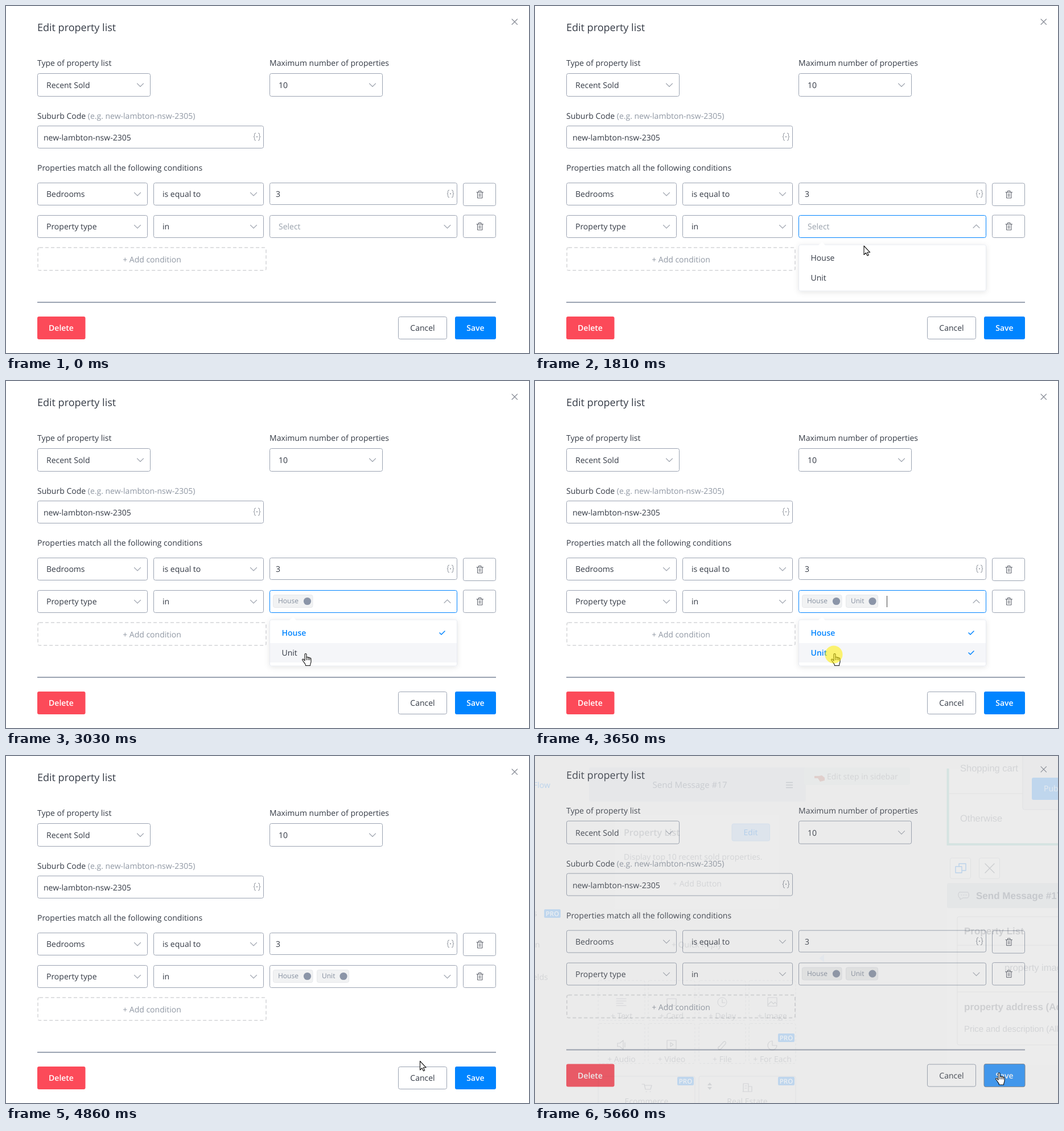
Recreate the animation shown at these times as an HTML page. Size 919 by 609 pixels, loop 5.88 s.

```html
<!DOCTYPE html>
<html lang="en">
<head>
<meta charset="utf-8">
<title>Edit property list</title>
<style>
  html, body { margin: 0; width: 100%; height: 100%; overflow: hidden; background: #fff; }
  svg { display: block; width: 919px; height: 609px; font: 14px "Open Sans", "Noto Sans", sans-serif; text-rendering: geometricPrecision; }
  .arial { font-family: "Liberation Sans", Arial, sans-serif; }
  .line { fill: none; stroke-linecap: round; stroke-linejoin: round; }
  #dialog { mix-blend-mode: multiply; }
</style>
</head>
<body>
<svg id="stage" viewBox="0 0 919 609" xmlns="http://www.w3.org/2000/svg"></svg>
<script>
const INK = '#343a45', MUTED = '#8f97a3', BORDER = '#9ba3b2', BLUE = '#0084ff', RED = '#fc4a59';

const text = (x, y, s, fill = INK, more = '') => `<text x="${x}" y="${y}" fill="${fill}" ${more}>${s}</text>`;
const mid = (x, y, s, fill, more = '') => text(x, y, s, fill, 'text-anchor="middle" ' + more);
const box = (x, y, w, h, stroke = BORDER, fill = 'none', r = 3, more = '') =>
  `<rect x="${x}" y="${y}" width="${w}" height="${h}" rx="${r}" stroke="${stroke}" fill="${fill}" ${more}/>`;
const line = (d, stroke, width = 1, more = '') =>
  `<path class="line" d="${d}" stroke="${stroke}" stroke-width="${width}" ${more}/>`;
const group = (id, body, more = '') => `<g id="${id}" ${more}>${body}</g>`;

const chevron = (x, y, up = 1) => line(`M${x - 5.5} ${y - 2.5 * up}l5.5 ${5.5 * up}l5.5 ${-5.5 * up}`, '#a0a6b0', 1.1);
const select = (x, y, w, h, label) =>
  box(x, y, w, h) + text(x + 15.5, Math.round(y + h / 2 + 5.4), label) + chevron(x + w - 17.5, y + h / 2);
const brace = (x, y, side) =>
  line(`M${x + 2.5 * side} ${y - 6.5}q${2 * side} 0 ${2 * side} 2.5v2q0 2 ${1.5 * side} 2q${-1.5 * side} 0 ${-1.5 * side} 2v2q0 2.5 ${-2 * side} 2.5`, '#858b95');
const braces = (x, y) => brace(x, y, -1) + brace(x, y, 1) + `<circle cx="${x}" cy="${y}" r="1" fill="#858b95"/>`;
const trash = y => box(803.5, y, 57, 39.5) +
  line(`M827 ${y + 16}h11.5M830.5 ${y + 15.5}v-2h4.5v2M828.5 ${y + 16}v10h8.5v-10M831.5 ${y + 18.5}v5M834 ${y + 18.5}v5`, '#5a5f69');
const tag = (id, x, w, label) => group(id,
  box(x + .5, 375.5, w, 22, '#e6e8eb', '#f1f2f3') + text(x + 9, 390, label, '#858f9f', 'font-size="12"') +
  `<circle cx="${x + w - 9}" cy="386.5" r="6.6" fill="#8b95a8"/>`);
const option = (i, label) => {
  const y = 442 + 35 * i;
  return `<rect id="hover${i}" x="464" y="${y - 17}" width="328" height="34" fill="#f5f6f9"/>` +
    text(484.5, y + 5, label, INK, `id="option${i}"`) +
    line(`M762 ${y}l3 3l6 -6`, BLUE, 1.5, `id="check${i}"`);
};

function dialog() {
  return text(55, 44, 'Edit property list', INK, 'font-size="18"') +
    line('M889 23l9.5 9.5M898.5 23l-9.5 9.5', '#858a94', 1.1) +
    text(55, 105, 'Type of property list') + select(55.5, 118.5, 198, 40, 'Recent Sold') +
    text(463, 105, 'Maximum number of properties') + select(463.5, 118.5, 198, 40, '10') +
    text(55, 198, `Suburb Code <tspan fill="${MUTED}">(e.g. new-lambton-nsw-2305)</tspan>`) +
    box(55.5, 210.5, 397, 39) + text(66, 236, 'new-lambton-nsw-2305') + braces(441, 229.5) +
    text(55, 289, 'Properties match all the following conditions') +
    select(55.5, 310.5, 193, 39, 'Bedrooms') + select(259.5, 310.5, 193, 39, 'is equal to') +
    box(463.5, 310.5, 329, 38) + text(474, 335, '3') + braces(781, 329.5) + trash(311) +
    select(55.5, 367.5, 193, 39, 'Property type') + select(259.5, 367.5, 193, 39, 'in') +
    box(463.5, 367.5, 329, 39, BORDER, 'none', 3, 'id="field"') +
    text(479, 392, 'Select', '#98a0ab', 'id="placeholder"') +
    group('down', chevron(775.5, 387)) + group('up', chevron(775.5, 387, -1)) +
    tag('tag0', 469, 69.5, 'House') + tag('tag1', 546, 56, 'Unit') +
    '<rect id="caret" y="377" width="1" height="20" fill="#444"/>' +
    trash(367) +
    box(56, 424, 401, 40, '#dedfe1', 'none', 3, 'stroke-width="2" stroke-dasharray="6 4"') +
    mid(256.5, 450, '+ Add condition', MUTED) +
    `<rect x="55" y="519" width="806" height="2" fill="${BORDER}"/>` +
    box(55, 545, 84.5, 40, 'none', RED) + mid(97, 570, 'Delete', '#fff', 'font-weight="600"') +
    box(689.5, 545.5, 85, 39) + mid(732, 570, 'Cancel') +
    box(789, 545, 72, 40, 'none', BLUE, 3, 'id="save"') + mid(825, 570, 'Save', '#fff', 'font-weight="600"');
}

const popup = () => box(463.5, 419, 329, 81, '#e8ebf1', '#fff', 3, 'filter="url(#shadow)"') +
  '<path d="M498 420l6 -6l6 6z" fill="#fff"/>' + option(0, 'House') + option(1, 'Unit');

// The dimmed editor that shows through while the dialog fades.
function page() {
  const faint = '#c3c5c9', edge = '#dadbdd', pale = '#eeeeee', sky = '#a3c9ef';
  const pro = (x, y) => box(x, y, 29, 15, 'none', sky, 2) + mid(x + 14.5, y + 12, 'PRO', '#eef3f8', 'font-size="11.5" font-weight="600"');
  const cell = (x, y, label) => box(x - 41, y - 38, 82, 70, edge, 'none', 3, 'stroke-dasharray="4 3"') + mid(x, y + 29, label, faint);
  const bold = 'class="arial" font-weight="700" font-size="17"', plain = 'class="arial" font-size="16.5"';
  const columns = [152, 240, 329, 417];
  const cells = [['+ Text', '+ Card', '+ Delay', '+ Image'], ['+ Audio', '+ Video', '+ File', '+ For Each']];
  return box(95, 20, 381, 60, 'none', '#e3e5e8') + mid(272, 56, 'Send Message #17', '#b3b8c0', 'font-size="15"') +
    line('M441.5 46.5h11M441.5 51h11M441.5 55.5h11', '#b5bac1', 1.3) +
    text(-3, 56, 'Flow', '#9cc4ec') +
    box(473, 20, 186, 31, 'none', '#e6e9e8') + text(513, 41, 'Edit step in sidebar', faint) +
    '<path d="M491 35h8l5 -1l5 4v5l-8 2l-4 -6h-6z" fill="#d9bdb8"/>' +
    box(140, 103, 288, 165, 'none', pale) + text(156, 140, 'Property List', faint, 'font-size="16" font-weight="600"') +
    box(346, 119, 66.5, 30, '#c5d8eb', '#d5e1ed') + mid(379, 139, 'Edit', '#8dbbea') +
    text(156, 182, 'Display top 10 recent sold properties.', faint) +
    mid(285, 229, '+ Add Button', faint) + pro(16, 269) +
    text(-3, 281, 's', faint) + text(0, 336, 'n', faint) + text(-4, 393, 'elds', faint) +
    mid(284, 336, '+ Quick Reply', faint) + '<path d="M499 355l9 -7v14z" fill="#dfe6ed"/>' +
    cells.map((row, r) => row.map((s, c) => cell(columns[c], 432 + r * 75.5, s)).join('')).join('') +
    line('M143 426h17M143 430h17M143 434h12M143 438h17M232 426h16v12h-16zM329 427v6h5M409 424h16v15h-16zM410 436l5 -5l4 4l3 -3l3 4', faint, 1.2) +
    '<circle cx="329" cy="432" r="8" fill="none" stroke="#c3c5c9"/>' +
    line('M145 504h4l6 -5v16l-6 -5h-4zM158 503v8M232 499h16v15h-16zM238 503v7l5 -3.5zM323 511l8 -9c3 -3 6 1 3 4l-7 8c-4 3 -7 -1 -4 -4zM417 500a8 8 0 1 0 8 8h-8z', faint, 1.2) +
    pro(427, 487) +
    box(111, 562, 170, 60, edge) + box(288, 562, 170, 60, edge) +
    line('M188 576h4l2 9h9l2 -7h-12M195 589h1M202 589h1M366 589v-14h9v14M375 580h6v9h-16M369 579h3M369 583h3', faint, 1.2) +
    '<path d="M303 578l4 -5l4 5zM303 581l4 5l4 -5z" fill="#c3c5c9"/>' +
    pro(250, 563) + pro(427, 563) + mid(196, 611, 'Ecommerce', faint) + mid(373, 611, 'Real Estate', faint) +
    '<path d="M725.5 22V155H919" fill="none" stroke="#c8dfdc" stroke-width="4"/>' +
    box(728, 22, 200, 131, 'none', pale, 0) + line('M728 66h191', edge) +
    text(747, 27, 'Shopping cart', faint, plain) + text(747, 115, 'Otherwise', faint, plain) +
    box(857, -5, 80, 99, edge, '#e9e9ea') + box(873, 38, 60, 39, 'none', sky) + text(894, 62, 'Pub', '#e3ebf3') +
    box(729.5, 179, 36, 36, edge, pale) + box(780.5, 179, 36, 36, edge, pale) +
    line('M739 194h11v11h-11zM745 194v-5h12v12h-6', '#9cc3ea', 1.4) + line('M791 189l16 16M807 189l-16 16', '#b8bbc0', 1.4) +
    box(724, 223, 210, 44, 'none', '#e1e3e5') + box(724, 267, 210, 275, 'none', pale, 0) +
    line('M746 239h14c3 0 3 10 0 10h-8l-5 3v-3c-4 0 -4 -10 -1 -10M749 244h1M753 244h1M757 244h1', '#b9bdc3') +
    text(775, 251, 'Send Message #17', '#aeb3ba', bold) +
    box(742, 282, 190, 225, edge) + line('M742 332h177M742 414h177', edge) +
    text(754, 313, 'Property List', '#bbbdc1', bold) + text(825, 377, 'property image', faint, plain) +
    text(754, 446, 'property address (Address)', '#bbbdc1', bold) +
    text(754, 484, 'Price and description (All)', faint, 'class="arial" font-size="15"');
}

const ARROW = 'M.5 .5V16L4 12.7L6.5 17.7L8.7 16.7L6.4 11.8H11.2Z';
const HAND = 'M5 13V2C5 0 8 0 8 2V7.5C8 6 11 6 11 8C11 6.7 13.7 6.8 13.7 8.7C13.7 7.6 16 7.8 16 9.7V14.5' +
  'C16 17 14.5 18 14.5 21.5H6.5C6.5 18.5 4.5 17.5 3.3 15.3L.8 11.8C0 10.3 2 9.3 3.2 10.8ZM8 7.5V12M11 8V12M13.7 9V12';
const cursor = (id, d) => `<path id="${id}" d="${d}" fill="#fff" stroke="#111" stroke-width="1.1" stroke-linejoin="round"/>`;

document.getElementById('stage').innerHTML =
  '<defs><filter id="shadow" x="-10%" y="-30%" width="120%" height="160%"><feDropShadow dx="0" dy="2" stdDeviation="5" flood-color="#000" flood-opacity=".1"/></filter></defs>' +
  '<rect width="919" height="609" fill="#fff"/>' +
  group('page', '<rect width="919" height="609" fill="#ebebeb"/>' + group('editor', page(), 'opacity=".6"')) +
  group('dialog', dialog()) + group('popup', popup()) +
  group('pointer', cursor('arrow', ARROW) + cursor('hand', HAND) +
    '<circle id="ripple" cx="5" cy="2" r="15.5" fill="#ffee00" fill-opacity=".55"/>');

const LOOP = 5880;
const steps = [
  { at: 0 },
  { at: 590, arrow: [869, 534] },
  { at: 1200, hand: [764, 385] },
  { at: 1810, arrow: [577.5, 420.5], open: true },
  { at: 2410, hand: [545, 443], click: true, open: true, picked: 1, hover: 0, caret: 555 },
  { at: 3030, hand: [520, 478], open: true, picked: 1, hover: 1 },
  { at: 3650, hand: [520, 478], click: true, open: true, picked: 2, hover: 1, caret: 618 },
  { at: 4230, arrow: [421, 497.5], open: true, picked: 2 },
  { at: 4860, arrow: [727, 535], picked: 2 },
  { at: 5460, hand: [809, 555], click: true, picked: 2, saving: true },
  { at: 5660, hand: [809, 555.5], picked: 2, saving: true, closing: true }
];

const $ = id => document.getElementById(id);
const show = (id, on) => $(id).setAttribute('display', on ? 'inline' : 'none');
const set = (id, name, value) => $(id).setAttribute(name, value);

function render(time) {
  const s = steps.filter(step => step.at <= time).pop();
  const { picked = 0, open = false, closing = false } = s;
  const at = s.arrow || s.hand || [0, 0];
  show('arrow', s.arrow);
  show('hand', s.hand);
  show('ripple', s.click);
  set('pointer', 'transform', `translate(${at})`);
  show('popup', open);
  show('up', open);
  show('down', !open);
  set('field', 'stroke', open ? BLUE : BORDER);
  show('placeholder', !picked);
  show('caret', s.caret);
  set('caret', 'x', s.caret || 0);
  [0, 1].forEach(i => {
    const chosen = picked > i;
    show('tag' + i, chosen);
    show('check' + i, chosen);
    show('hover' + i, s.hover === i);
    set('option' + i, 'fill', chosen ? BLUE : INK);
    set('option' + i, 'font-weight', chosen ? 600 : 400);
  });
  set('save', 'fill', s.saving ? '#2b97ff' : BLUE);
  set('save', 'stroke', closing ? '#777f8b' : 'none');
  show('page', closing);
  set('dialog', 'transform', `translate(0 ${closing ? -4.4 : 0})`);
  set('dialog', 'opacity', closing ? .87 : 1);
}

const start = performance.now();
function tick() {
  render((performance.now() - start) % LOOP);
  requestAnimationFrame(tick);
}
tick();
</script>
</body>
</html>
```
